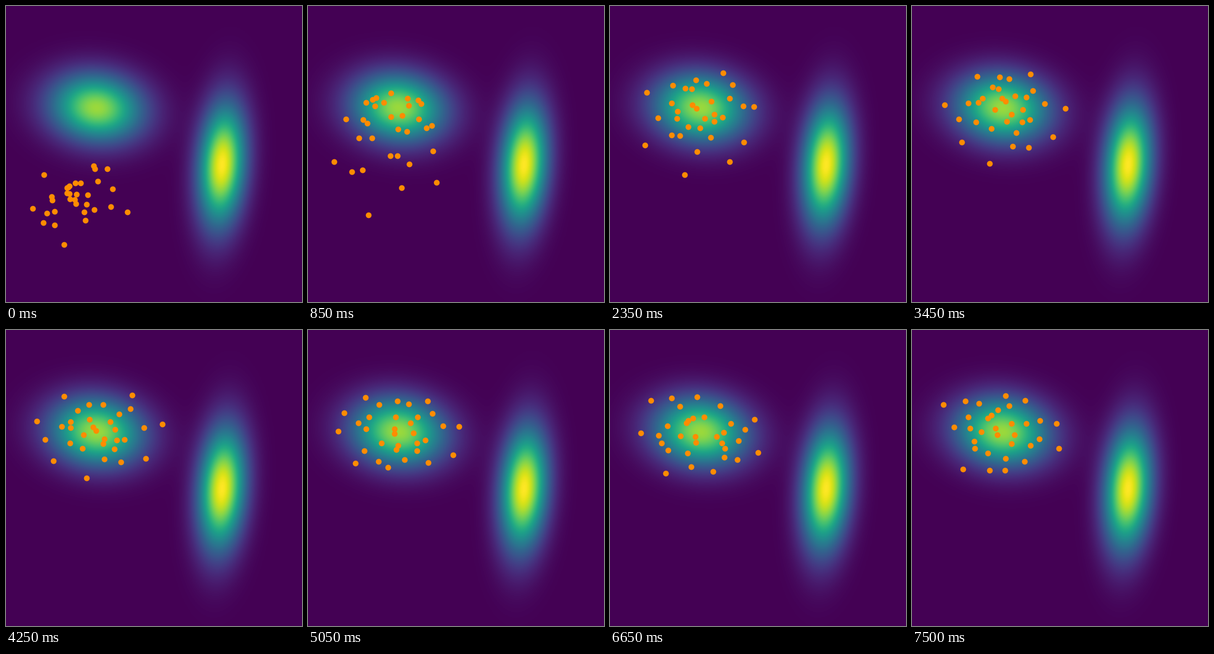
These frames come from a looping animation (500 px wide and 500 px high, 7.55 s). A matplotlib script:

```python
import numpy as np
import matplotlib.pyplot as plt
from matplotlib.animation import FuncAnimation

SIZE, FRAMES, INTERVAL = 500, 151, 50
UNIT = 50.0     # pixels per model unit
STEP = 0.3
HEAT = 0.4      # strength of the random part of the motion
COUNT = 32

# Two-component mixture: height, mean, spread (pixels) and correlation
MODES = [
    (0.85, (153, 172), (54, 39.5), 0.09),
    (1.00, (365, 268), (27.3, 70), -0.16),
]

# Outermost particles of the starting cloud
RIM = [(45, 342), (205, 348), (98, 403), (148, 270), (64, 285), (63, 366)]


def start_cloud(rng):
    core = rng.normal(size=(COUNT - len(RIM), 2))
    core = np.clip((core - core.mean(axis=0)) / core.std(axis=0), -1.9, 1.9)
    return np.vstack([RIM, (121, 322) + core * (31, 25)])


def components(pts):
    """Density and score of every mixture component at pts (model units)."""
    dens, scores = [], []
    for height, mean, (sx, sy), rho in MODES:
        cov = np.array([[sx**2, rho * sx * sy], [rho * sx * sy, sy**2]]) / UNIT**2
        diff = pts - np.array(mean) / UNIT
        score = -diff @ np.linalg.inv(cov)
        dens.append(height * np.exp(0.5 * np.sum(diff * score, axis=-1)))
        scores.append(score)
    return np.array(dens), np.array(scores)


def grad_log(pts):
    dens, scores = components(pts)
    weights = dens / (dens.sum(axis=0) + 1e-300)
    return (weights[..., None] * scores).sum(axis=0)


def stein_step(pts, rng):
    """One step of Stein variational descent with kernel-shaped noise."""
    sq = ((pts[:, None] - pts[None]) ** 2).sum(axis=-1)
    h2 = 0.5 * np.median(sq) / np.log(COUNT + 1)
    k = np.exp(-sq / (2 * h2))
    repulsion = (pts * k.sum(axis=1, keepdims=True) - k @ pts) / h2
    drift = (k @ grad_log(pts) + repulsion) / COUNT
    root = np.linalg.cholesky(k / COUNT + 1e-8 * np.eye(COUNT))
    noise = root @ rng.normal(size=pts.shape)
    return pts + STEP * drift + HEAT * np.sqrt(2 * STEP) * noise


def simulate():
    rng = np.random.default_rng(4)
    path = [start_cloud(rng) / UNIT]
    while len(path) < FRAMES:
        path.append(stein_step(path[-1], rng))
    return np.array(path) * UNIT


path = simulate()

fig = plt.figure(figsize=(5, 5), dpi=100)
ax = fig.add_axes([0, 0, 1, 1])
ax.axis("off")

axis = np.arange(SIZE) + 0.5
grid = np.stack(np.meshgrid(axis, axis), axis=-1)
field = components(grid / UNIT)[0].sum(axis=0)
ax.imshow(field, cmap="viridis", extent=(0, SIZE, SIZE, 0), aspect="auto")
dots, = ax.plot([], [], "o", color="darkorange")
ax.set_xlim(0, SIZE)
ax.set_ylim(SIZE, 0)


def draw(i):
    dots.set_data(path[i][:, 0], path[i][:, 1])
    return dots,


anim = FuncAnimation(fig, draw, frames=FRAMES, interval=INTERVAL,
                     repeat=True, repeat_delay=0, blit=False)
plt.show()
```
